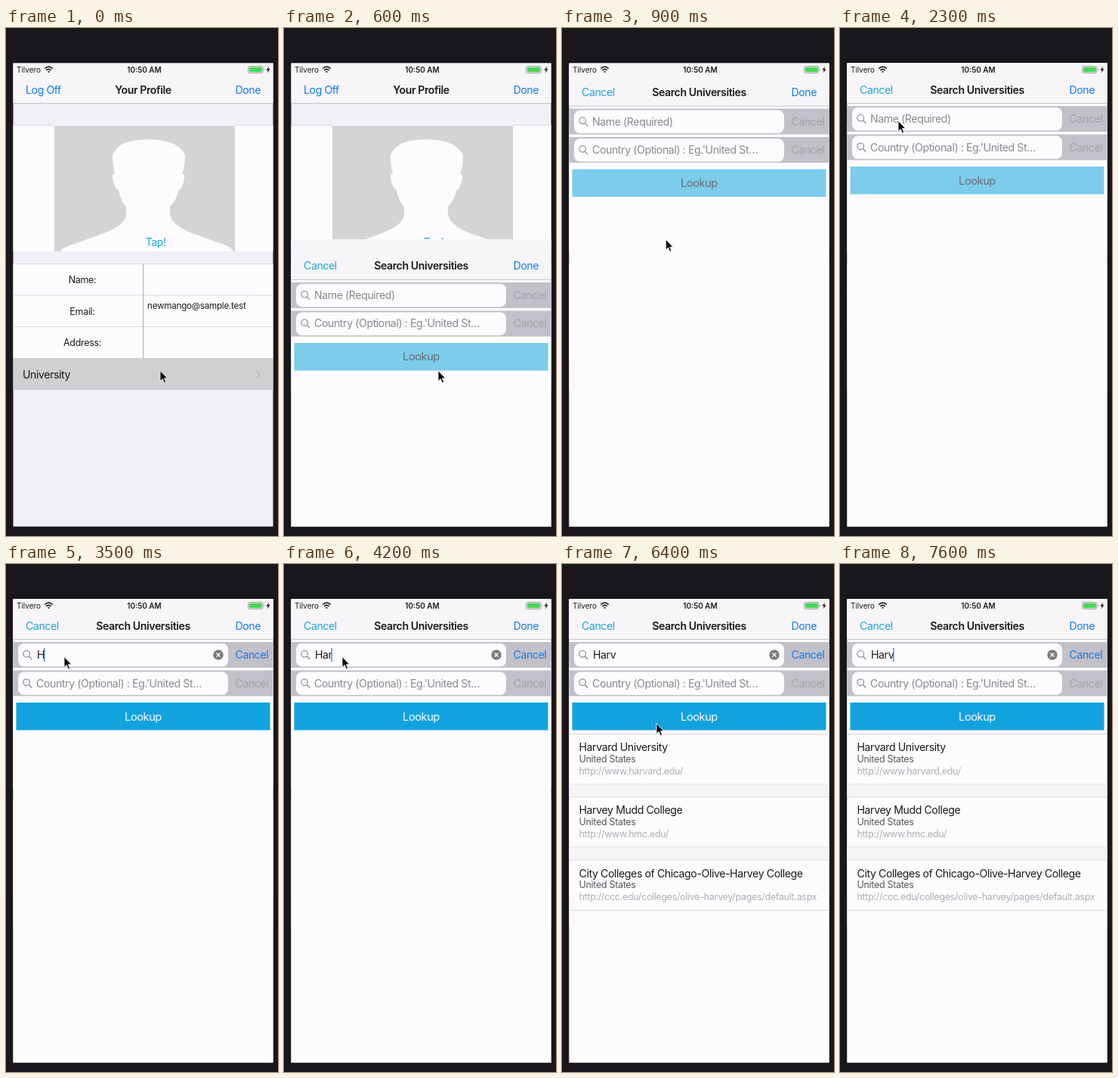
Write an HTML page that moves like this. It is 360x671 px and loops after 7700 ms.

```html
<!DOCTYPE html>
<html lang="en">
<head>
<meta charset="utf-8">
<title>University search</title>
<style>
  html, body { margin: 0; width: 100%; height: 100%; overflow: hidden; background: #19171b; }
  svg { display: block; width: 360px; height: 671px; }
  text { font: 14.13px Inter, "Open Sans", sans-serif; letter-spacing: -.029em; fill: #1b1a1d; white-space: pre; }
  .mid { text-anchor: middle; }
  .title { font-weight: 600; text-anchor: middle; }
  .label { font-size: 12.47px; letter-spacing: -.024em; }
  .email { font-size: 11.63px; letter-spacing: -.02em; }
  .status { font-size: 9.97px; letter-spacing: 0; }
  .blue { fill: #0f7cee; }
  .teal { fill: #1fa6d8; }
  .hint { fill: #8b898f; }
  .off { fill: #a5a3a9; }
  .sub { fill: #59575c; }
  .url { fill: #b1afb4; }
  .line { stroke: #dad8dc; fill: none; }
  .edge { stroke: #c6c4c9; fill: none; }
  .white { fill: #fdfbfe; }
  .bar { fill: #f7f5f8; }
  .grey { fill: #f2f0f4; }
</style>
</head>
<body>
<svg viewBox="0 0 360 671">
  <defs>
    <clipPath id="screen"><path d="M9.5 46.5H353.5V658.5H9.5Z"/></clipPath>
    <g id="field">
      <path d="M9 103H354V137H9Z" fill="#c2c0c8"/>
      <rect x="16" y="105" width="278" height="30.5" rx="8" class="white"/>
      <g fill="none" stroke="#87858b" stroke-width="1.1">
        <circle cx="27.2" cy="118.8" r="4.3"/><path d="M30.4 122L34.3 126"/>
      </g>
    </g>
  </defs>

  <g clip-path="url(#screen)">
    <g id="profile">
      <path class="grey" d="M9 46H354V659H9Z"/>
      <path class="bar" d="M9 46H354V99H9Z"/>
      <path class="edge" d="M9 99.5H354"/>
      <text class="blue" x="26" y="86.5">Log Off</text>
      <text class="title" x="181.5" y="86.5">Your Profile</text>
      <text class="blue" x="303.5" y="86.5">Done</text>

      <path class="white" d="M9 128H354V295H9ZM9 312H354V436H9Z"/>
      <path d="M64 129H303V295H64Z" fill="#d4d3d5"/>
      <path class="white" d="M72 295Q74 291 80 289L130 271Q153 262 158 251Q160 243 159 236Q152 229 149 214Q143 212 141 197Q140 192 144 193Q140 175 141 168Q144 160 154 153Q168 147 188 147Q208 147 222 153Q234 160 237 168Q237 182 233 193Q237 192 236 198Q234 212 228 215Q225 229 217 236Q216 246 219 252Q224 262 246 271L288 286Q299 290 301 295Z"/>
      <text class="teal mid" x="198" y="288">Tap!</text>
      <path class="line" d="M9 128.5H64M303 128.5H354M9 311.5H354M9 353H354M9 394.5H354"/>
      <path d="M181.5 312V436" stroke="#b0aeb4"/>
      <text class="label mid" x="101" y="337">Name:</text>
      <text class="label mid" x="101" y="378.5">Email:</text>
      <text class="label mid" x="101" y="420">Address:</text>
      <text class="email" x="187" y="371">newmango@sample.test</text>
      <path d="M9 436H354V478H9Z" fill="#d0cfd1"/>
      <text x="22" y="462.5">University</text>
      <path d="M331.5 452.5L336.5 457.5L331.5 462.5" fill="none" stroke="#b5b3b8" stroke-width="1.3"/>
    </g>

    <g id="sheet">
      <path class="white" d="M9 46H354V659H9Z"/>
      <path class="bar" d="M9 46H354V99H9Z"/>
      <path class="edge" d="M9 99.5H354"/>
      <text class="teal" x="26" y="86.5">Cancel</text>
      <text class="title" x="181.5" y="86.5">Search Universities</text>
      <text class="blue" x="303.5" y="86.5">Done</text>

      <use href="#field"/>
      <text id="nameHint" class="hint" x="40" y="125">Name (Required)</text>
      <text id="query" x="41" y="125"></text>
      <path id="caret" d="M0 111V129" stroke="#3f7fd6" stroke-width="1.4"/>
      <g id="clear">
        <circle cx="281" cy="120" r="6.7" fill="#7d7b80"/>
        <path d="M278.5 117.5L283.5 122.5M283.5 117.5L278.5 122.5" stroke="#fff" stroke-width="1.3"/>
      </g>
      <text id="cancel" x="303.5" y="125">Cancel</text>

      <use href="#field" y="37.5"/>
      <text class="hint" x="40" y="162.5">Country (Optional) : Eg.'United St…</text>
      <text class="off" x="303.5" y="162.5">Cancel</text>

      <path id="button" d="M13.5 183H349.5V219.5H13.5Z"/>
      <text id="lookup" class="mid" x="181.5" y="206.5" style="font-size:14.6px">Lookup</text>
      <g id="results"></g>
    </g>

    <text class="status" x="14" y="58.8">Tilvero</text>
    <g fill="none" stroke="#1b1a1d" stroke-width="1.6">
      <path d="M51.3 53.6Q56.5 48.8 61.7 53.6M53.3 55.9Q56.5 53 59.7 55.9"/>
      <path d="M56.5 59.3L54.9 57.6Q56.5 56.3 58.1 57.6Z" fill="#1b1a1d" stroke="none"/>
    </g>
    <text class="status title" x="183" y="58.8">10:50 AM</text>
    <rect x="320.5" y="50.5" width="19.5" height="9" rx="2" fill="none" stroke="#8f8d92" stroke-width=".8"/>
    <rect x="321.8" y="51.8" width="17" height="6.4" rx="1" fill="#4cd45c"/>
    <path d="M341.2 53.3Q343 55 341.2 56.7Z" fill="#8f8d92"/>
    <path d="M348.3 50.5L344.3 55.6H346.7L345.6 59.6L349.7 54.3H347.2Z" fill="#1b1a1d"/>
  </g>

  <path id="pointer" d="M0 0V14L3.2 11L5.4 16.2L7.7 15.2L5.5 10.2H9.8Z" fill="#0c0b0d" stroke="#f8f8f8" stroke-width=".9"/>
</svg>

<script>
const LOOP = 7700, STEP = 100;
const el = id => document.getElementById(id);
const show = (id, on) => el(id).setAttribute("visibility", on ? "visible" : "hidden");
const clamp = x => Math.max(0, Math.min(1, x));

const colleges = [
  ["Harvard University", "http://www.harvard.edu/"],
  ["Harvey Mudd College", "http://www.hmc.edu/"],
  ["City Colleges of Chicago-Olive-Harvey College", "http://ccc.edu/colleges/olive-harvey/pages/default.aspx"]
];
el("results").innerHTML = colleges.map(([name, url], i) => `
  <g transform="translate(0 ${i * 83.2})">
    ${i ? '<path class="bar" d="M9 208H354V224H9Z"/>' : ""}
    <path class="line" d="M9 224.5H354M9 291H354"/>
    <text x="22.5" y="247.3">${name}</text>
    <text class="label sub" x="22.5" y="261.5">United States</text>
    <text class="label url" x="22.5" y="278">${url}</text>
  </g>`).join("");

const FOCUS = 2700, RESULTS = 5600;
const keyTimes = [3500, 3800, 4100, 4400];

// Critically damped spring from the bottom of the screen
function sheetOffset(t) {
  const x = Math.max(0, t - 478) * .0172;
  const y = 613 * (1 + x) * Math.exp(-x);
  return y < .2 ? 0 : y;
}

const outCubic = x => 1 - (1 - x) ** 3;
const smooth = x => x * x * (3 - 2 * x);

function pointerAt(t) {
  const a = outCubic(clamp((t - 800) / 455));
  const b = smooth(clamp((t - 5000) / 400));
  return [204 - 127 * a + 48 * b, 452.5 - 330 * a + 88 * b];
}

function caretOpacity(t) {
  if (t < FOCUS) return 0;
  if (t >= keyTimes[0] && t < 4900) return 1;
  const p = (t + 530) % 1000;
  return p < 130 ? p / 130 : 1 - clamp((p - 600) / 150);
}

function draw(t) {
  const typed = keyTimes.filter(k => t >= k).length;
  const enabled = typed > 0 && !(t >= RESULTS && t < RESULTS + 200);

  el("sheet").setAttribute("transform", `translate(0 ${sheetOffset(t)})`);
  el("pointer").setAttribute("transform", `translate(${pointerAt(t)})`);
  show("pointer", t < 6900);

  el("query").textContent = "Harv".slice(0, typed);
  show("nameHint", !typed);
  show("clear", typed);
  show("results", t >= RESULTS);

  const caretX = 40.6 + (typed ? el("query").getComputedTextLength() : 0);
  el("caret").setAttribute("transform", `translate(${caretX} 0)`);
  el("caret").setAttribute("opacity", caretOpacity(t));

  el("cancel").setAttribute("class", t >= FOCUS ? "blue" : "off");
  el("button").setAttribute("fill", enabled ? "#12a3df" : "#7bcdeb");
  el("lookup").style.fill = enabled ? "#fdfbfe" : "#6c6d71";
}

const start = performance.now();
function tick() {
  const t = (performance.now() - start) % LOOP;
  draw(Math.floor(t / STEP) * STEP);
  requestAnimationFrame(tick);
}
tick();
</script>
</body>
</html>
```
